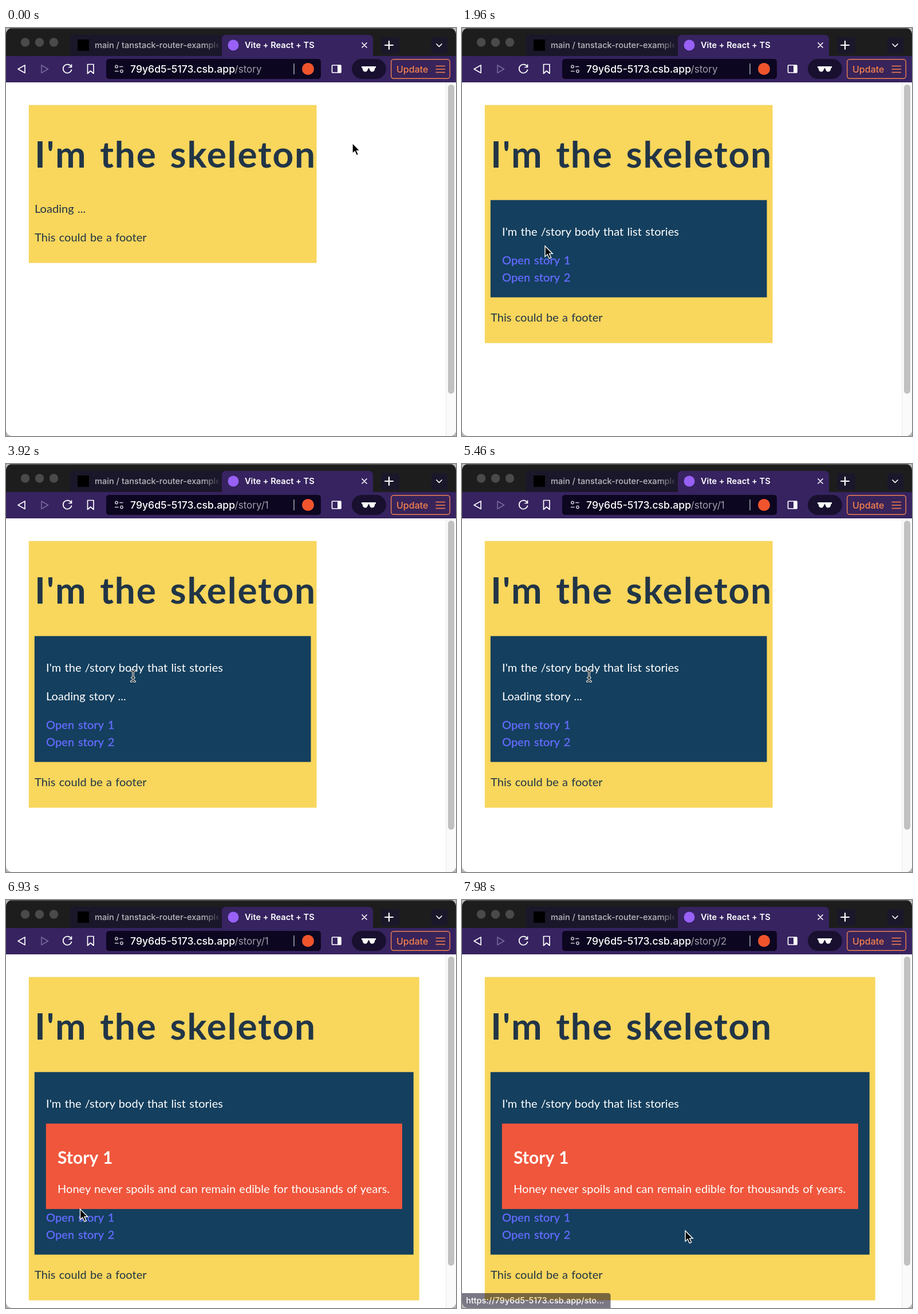
Write an HTML page that moves like this. It is 786x713 px and loops after 8 s.

```html
<!DOCTYPE html>
<html lang="en">
<head>
<meta charset="utf-8">
<title>Skeleton loading</title>
<style>
html, body { margin: 0; width: 100%; height: 100%; overflow: hidden; background: #b8b8b8; }
svg { display: block; }
text { white-space: pre; }
.ui { font: 500 14.6px Inter, sans-serif; fill: #fff; }
.page { font: 20px Lato, sans-serif; letter-spacing: .002em; word-spacing: .055em; fill: #fff; }
.dark { fill: #213547; }
.title { font-size: 64px; font-weight: 700; letter-spacing: .028em; word-spacing: .085em; }
.link { fill: #646cff; stroke: #646cff; stroke-width: .35; letter-spacing: .005em; word-spacing: .085em; }
.line { fill: none; stroke: #fff; stroke-width: 1.7; stroke-linecap: round; stroke-linejoin: round; }
</style>
</head>
<body>
<svg width="786" height="713" viewBox="0 0 786 713">
  <defs>
    <clipPath id="win"><rect width="786" height="713" rx="11"/></clipPath>
    <linearGradient id="fade" gradientUnits="userSpaceOnUse" x1="345" x2="372">
      <stop stop-color="#b8b7bc"/><stop offset="1" stop-color="#b8b7bc" stop-opacity=".1"/>
    </linearGradient>
    <clipPath id="tab"><rect x="150" y="15" width="222" height="30"/></clipPath>
    <path id="ibeam" d="M-3.5-9Q0-9 0-6Q0-9 3.5-9M0-6V7M-3.5 10Q0 10 0 7Q0 10 3.5 10M-2 3.5H2"/>
  </defs>
  <g clip-path="url(#win)">
    <rect width="786" height="713" fill="#fff"/>

    <!-- tab strip -->
    <rect width="786" height="50" fill="#1d1d1e"/>
    <path d="M8 .8H778" stroke="#6a6a6a"/>
    <g fill="#1b172a">
      <rect x="112" y="12" width="270" height="38"/>
      <rect x="655" y="16" width="32" height="29" rx="4"/>
      <rect x="743" y="16" width="28" height="29" rx="4"/>
    </g>
    <g fill="#4a4a4b"><circle cx="33.5" cy="25" r="7.7"/><circle cx="58.5" cy="25" r="7.7"/><circle cx="83.5" cy="25" r="7.7"/></g>
    <rect x="125" y="20" width="20" height="20" fill="#000"/>
    <g clip-path="url(#tab)"><text class="ui" x="155" y="35" style="fill:url(#fade)">main / tanstack-router-example</text></g>
    <path d="M377 50V20Q377 12 385 12H633Q641 12 641 20V50Z" fill="#362360"/>
    <circle cx="397" cy="30" r="9.5" fill="#9860f5"/>
    <text class="ui" x="417" y="35" style="font-weight:600">Vite + React + TS</text>
    <path class="line" d="M622 26l8 8m0-8l-8 8M752 28l4.5 4.5 4.5-4.5"/>
    <path class="line" d="M662 30h14m-7-7v14" style="stroke-width:2.2"/>

    <!-- toolbar -->
    <rect y="49" width="786" height="46" fill="#362360"/>
    <g class="line">
      <path d="M33 65V78.5L21 71.7Z"/>
      <path d="M62 65V78.5L73.5 71.7Z" stroke="#75679a"/>
      <path d="M113.5 67A7.5 7.5 0 1 0 114.5 73M114.5 64V68.5H110"/>
      <path d="M142.5 63.5H153V79.5L147.7 75L142.5 79.5Z"/>
    </g>
    <rect x="175" y="54" width="375" height="35" rx="5" fill="#0c0620"/>
    <g class="line" style="stroke:#c9c6d2;stroke-width:1.5">
      <circle cx="193" cy="67.5" r="2.2"/><path d="M198.5 67.5H204M190.5 75.5H196"/><circle cx="202" cy="75.5" r="2.2"/>
    </g>
    <text class="ui" x="217" y="78" style="font-size:17.6px">79y6d5-5173.csb.app</text>
    <text class="ui" id="path" x="399.5" y="78" style="font-size:17.1px;font-weight:400;fill:#a19eab"></text>
    <path d="M503 62V81" stroke="#aaa7b5" stroke-width="1.5"/>
    <circle cx="527.5" cy="71.5" r="10.5" fill="#f0542d"/>
    <rect class="line" x="569.5" y="65" width="15.5" height="13" rx="1"/>
    <rect x="579" y="65" width="6" height="13" fill="#fff"/>
    <rect x="604" y="54" width="60" height="35" rx="17.5" fill="#18102e"/>
    <path d="M621 67H646V69.5L644.5 70Q644 76.5 639.5 76.5Q635.5 76.5 634.5 70.5H632.5Q631.5 76.5 627.5 76.5Q623 76.5 622.5 70L621 69.5Z" fill="#fff"/>
    <rect x="672.7" y="54.7" width="102.6" height="33.6" rx="4.5" fill="#38235a" stroke="#ef8050" stroke-width="1.4"/>
    <text class="ui" x="682" y="77.5" style="font-size:16px;fill:#f5824c">Update</text>
    <path d="M750.5 66.5h16.5m-16.5 5.5h16.5m-16.5 5.5h16.5" stroke="#f5824c" stroke-width="1.5"/>

    <!-- scrollbar -->
    <rect x="768" y="95" width="18" height="618" fill="#fafafa"/>
    <path d="M768.5 95V713" stroke="#e8e8e8"/>
    <rect x="772" y="99" width="11" height="540" rx="5.5" fill="#c1c1c1"/>

    <!-- page -->
    <g class="page">
      <rect id="frame" x="39.8" y="134.6" fill="#f9d65c"/>
      <text class="dark title" x="50" y="244">I'm the skeleton</text>
      <text class="dark" id="loading" x="50" y="322.5">Loading ...</text>
      <g id="body">
        <rect id="panel" x="49.8" y="300.7" fill="#143f5e"/>
        <text x="70" y="362.5">I'm the /story body that list stories</text>
        <text id="wait" x="70" y="412.5">Loading story ...</text>
        <g id="story">
          <rect x="69.8" y="390.7" width="622.2" height="149.3" fill="#f0563c"/>
          <text x="90" y="461" style="font-size:30px;font-weight:700">Story 1</text>
          <text x="90" y="511.5">Honey never spoils and can remain edible for thousands of years.</text>
        </g>
        <g id="links">
          <text class="link" x="70" y="412.5">Open story 1</text>
          <text class="link" x="70" y="442.5">Open story 2</text>
        </g>
      </g>
      <text class="dark" id="footer" x="50">This could be a footer</text>
    </g>

    <g id="status">
      <path d="M0 687H255Q259.5 687 259.5 691.5V713H0Z" fill="#120d26"/>
      <text class="ui" x="7" y="705" style="font-size:14.5px">https://79y6d5-5173.csb.app/sto...</text>
    </g>

    <!-- pointer -->
    <g id="pointer">
      <circle id="ring" r="31" cx="-1" cy="1" fill="#fff" fill-opacity=".1" stroke="#e4e8ee" stroke-opacity=".7" stroke-width="3.5"/>
      <path id="arrow" d="M0 0V18.5L4.2 14.6L7.4 21.7L10.6 20.3L7.5 13.4H13.2Z" fill="#000" stroke="#fff" stroke-width="1.4"/>
      <g id="beam" fill="none" stroke-linecap="round">
        <use href="#ibeam" stroke="#fff" stroke-width="3.4"/>
        <use href="#ibeam" stroke="#111" stroke-width="1.3"/>
      </g>
      <path id="hand" d="M1.5 1.5Q3.5 .5 4.3 2.5L6 7.5Q7.5 6 8.7 7.5Q10.3 6.5 11.3 8Q13.2 7.3 13.7 9.5Q15 14 13.5 18V20H6L5.3 18L-1.5 13.5Q-2.8 12 -1 11Q.5 10.5 2.5 12L.5 4Q0 2.2 1.5 1.5ZM7 14v3m2.5-3v3m2.5-3v3" fill="#fff" stroke="#000" stroke-width="1.1" stroke-linejoin="round"/>
    </g>
  </g>
</svg>
<script>
const LOOP = 8000, STEP = 70;
const BODY = 770, CLICK1 = 2590, WAIT = 3640, STORY = 6160, CLICK2 = 7350;
const $ = id => document.getElementById(id);
const show = (id, on) => $(id).style.display = on ? '' : 'none';
const set = (id, attrs) => { for (const k in attrs) $(id).setAttribute(k, attrs[k]); };
const ramp = (t, a, b) => Math.min(1, Math.max(0, (t - a) / (b - a)));
const within = (t, a, b) => t >= a && t < b;

// time, x, y
const route = [
  [1050, 605, 201], [1960, 145, 381], [2150, 122, 405],
  [2750, 122, 405], [3080, 222, 370],
  [6440, 222, 370], [7140, 104, 587],
  [7490, 104, 587], [7910, 390, 578]
];

function pointerAt(t) {
  let [, x, y] = route[0];
  for (let i = 1; i < route.length; i++) {
    const [t0, x0, y0] = route[i - 1], [t1, x1, y1] = route[i];
    if (t < t0) break;
    const p = ramp(t, t0, t1), e = p * p * (3 - 2 * p);
    x = x0 + (x1 - x0) * e;
    y = y0 + (y1 - y0) * e;
  }
  return [x, y];
}

function draw(t) {
  const body = t >= BODY, story = t >= STORY, wait = t >= WAIT && !story;
  const grow = story ? 289 : wait ? 190 : body ? 140 : 0;
  const width = story ? 682 : 502.7;
  set('frame', { width, height: 276 + grow });
  set('panel', { width: width - 20, height: 30 + grow });
  set('links', { transform: `translate(0 ${story ? 149 : wait ? 50 : 0})` });
  set('footer', { y: 372.5 + grow });
  show('loading', !body);
  show('body', body);
  show('wait', wait);
  show('story', story);
  $('path').textContent = '/story' + (t >= CLICK2 ? '/2' : t >= CLICK1 ? '/1' : '');

  // link bubble: quick fade in, delayed fade out
  const bubble = (on, off) => ramp(t, on, on + 120) - ramp(t, off, off + 270);
  $('status').style.opacity = bubble(2130, 3200) + bubble(7080, 7860);

  const hand = within(t, 2080, 2860) || within(t, 7070, 7580);
  const beam = within(t, 2950, 6500);
  show('hand', hand);
  show('beam', beam);
  show('arrow', !hand && !beam);
  show('ring', within(t, CLICK1 - 70, CLICK1 + 140) || within(t, CLICK2, CLICK2 + 140));
  set('pointer', { transform: `translate(${pointerAt(t)})` });
}

function tick() {
  const t = performance.now() % LOOP;
  draw(Math.floor(t / STEP) * STEP);
  requestAnimationFrame(tick);
}
tick();
</script>
</body>
</html>
```
